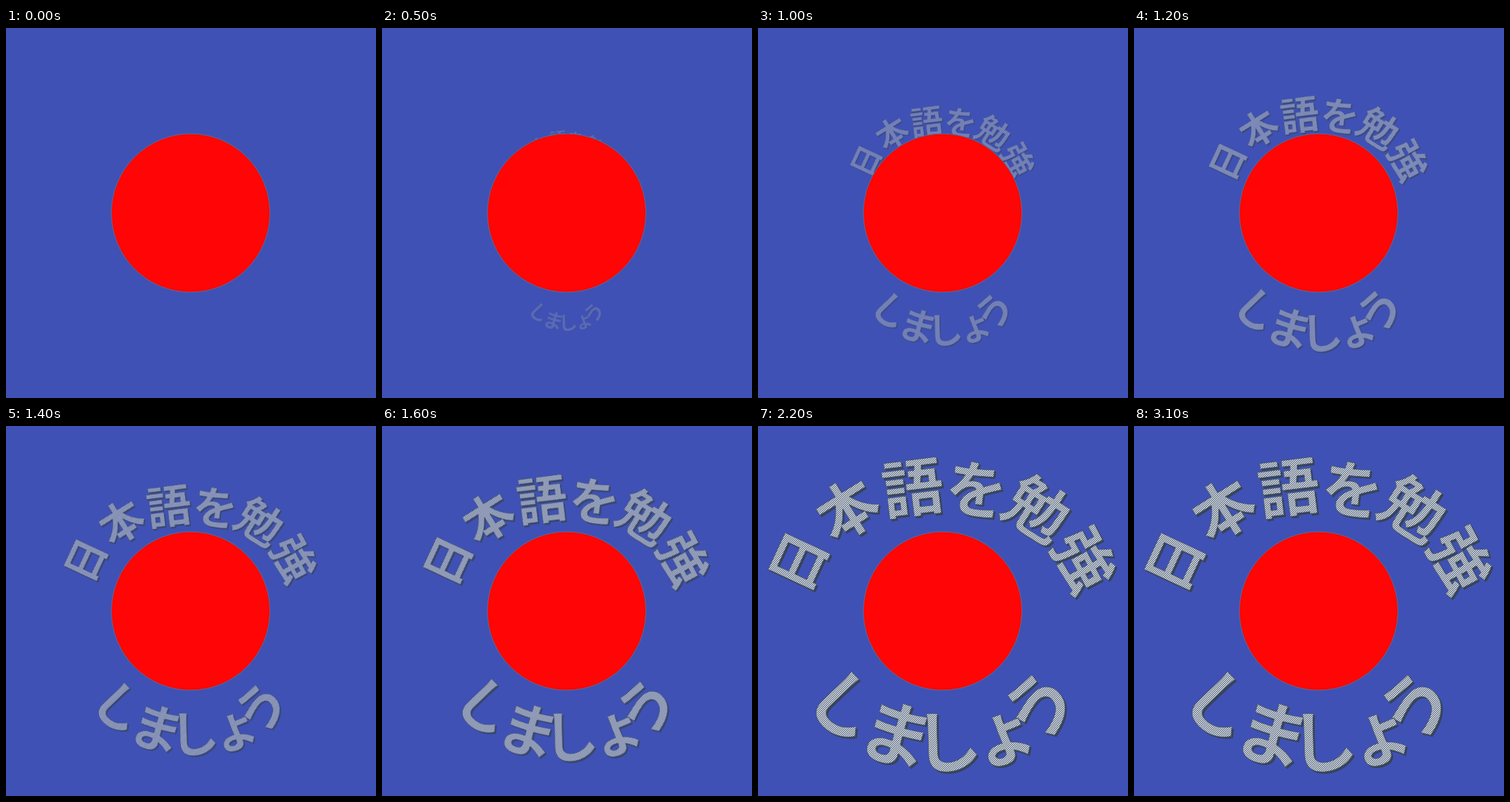
Write an HTML page with a canvas that moves like this. It is 518 by 518 pixels and loops after 4 s.

```html
<!DOCTYPE html>
<html lang="ja">
<head>
<meta charset="utf-8">
<style>
  html, body { margin: 0; height: 100%; overflow: hidden; background: #3f51b5; }
  canvas { display: block; }
</style>
</head>
<body>
<canvas id="stage" width="518" height="518"></canvas>
<script>
const SIZE = 518, LOOP = 4000, STEP = 100;
const INK = '#44546a', SHADOW = '#364358';
const HATCH = ['#5a687c', '#a8b1bc', '#e0e4e9'];
const stage = document.getElementById('stage').getContext('2d');

// Each glyph: character, ink centre x, y, rotation in degrees, font size.
const upper = { anchor: [258.5, 182], glyphs: [
  ['日', 58.5, 190.5, -65, 81], ['本', 125, 116, -32, 85], ['語', 216.5, 87, -7, 87],
  ['を', 305, 88, 8, 87], ['勉', 390, 116.5, 32, 88], ['強', 457, 188, 62, 86]] };
const lower = { anchor: [258.5, 401], glyphs: [
  ['し', 125.5, 397.5, 45, 96], ['ま', 195.5, 432.5, 17, 101], ['し', 272, 443, -3, 96],
  ['ょ', 345, 439, -20, 97], ['う', 393.5, 393, -46, 99]] };

function makeLayer(size) {
  const canvas = document.createElement('canvas');
  canvas.width = canvas.height = size;
  return canvas.getContext('2d');
}

function makeHatch() {
  const n = HATCH.length, c = makeLayer(n);
  for (let y = 0; y < n; y++)
    for (let x = 0; x < n; x++) {
      c.fillStyle = HATCH[(x + y) % n];
      c.fillRect(x, y, 1, 1);
    }
  return c.createPattern(c.canvas, 'repeat');
}

function drawGlyphs(c, glyphs, method, offset = 0) {
  for (const [char, x, y, angle, size] of glyphs) {
    c.save();
    c.translate(x + offset, y + offset);
    c.rotate(angle * Math.PI / 180);
    c.font = `700 ${size}px "Noto Sans CJK JP", "Noto Sans CJK", sans-serif`;
    const m = c.measureText(char);
    c[method](char,
      (m.actualBoundingBoxLeft - m.actualBoundingBoxRight) / 2,
      (m.actualBoundingBoxAscent - m.actualBoundingBoxDescent) / 2);
    c.restore();
  }
}

function renderText({ glyphs }) {
  const c = makeLayer(SIZE);
  drawGlyphs(c, glyphs, 'fillText');
  c.globalCompositeOperation = 'source-atop';
  c.fillStyle = makeHatch();
  c.fillRect(0, 0, SIZE, SIZE);
  c.globalCompositeOperation = 'source-over';
  c.strokeStyle = INK;
  c.lineWidth = 0.8;
  c.lineJoin = 'round';
  drawGlyphs(c, glyphs, 'strokeText');
  c.globalCompositeOperation = 'destination-over';
  c.fillStyle = SHADOW;
  drawGlyphs(c, glyphs, 'fillText', 2.6);
  return c.canvas;
}

// Zoom progress as [time, scale] points, joined by straight lines.
const zoom = [[200, 0.13], [800, 0.432], [1300, 0.68], [1600, 0.824], [1800, 0.941], [1900, 1]];
function scaleAt(t) {
  if (t < zoom[0][0]) return 0;
  const i = zoom.findIndex(([time]) => time > t);
  if (i < 0) return 1;
  const [t0, s0] = zoom[i - 1], [t1, s1] = zoom[i];
  return s0 + (s1 - s0) * (t - t0) / (t1 - t0);
}

const texts = [upper, lower].map(text => ({ image: renderText(text), anchor: text.anchor }));

function draw(now) {
  const t = Math.floor(now % LOOP / STEP) * STEP;
  const scale = scaleAt(t);
  stage.fillStyle = '#3f51b5';
  stage.fillRect(0, 0, SIZE, SIZE);

  if (scale > 0) for (const { image, anchor: [x, y] } of texts) {
    stage.save();
    stage.globalAlpha = scale;
    stage.imageSmoothingQuality = 'high';
    stage.translate(x, y);
    stage.scale(scale, scale);
    stage.drawImage(image, -x, -y);
    stage.restore();
  }

  stage.beginPath();
  stage.arc(258.5, 259, 111, 0, 2 * Math.PI);
  stage.fillStyle = '#ff0505';
  stage.fill();
  stage.strokeStyle = '#5b6a92';
  stage.lineWidth = 1;
  stage.stroke();
}

const start = performance.now();
function tick() {
  draw(performance.now() - start);
  requestAnimationFrame(tick);
}
draw(0);
requestAnimationFrame(tick);
</script>
</body>
</html>
```
